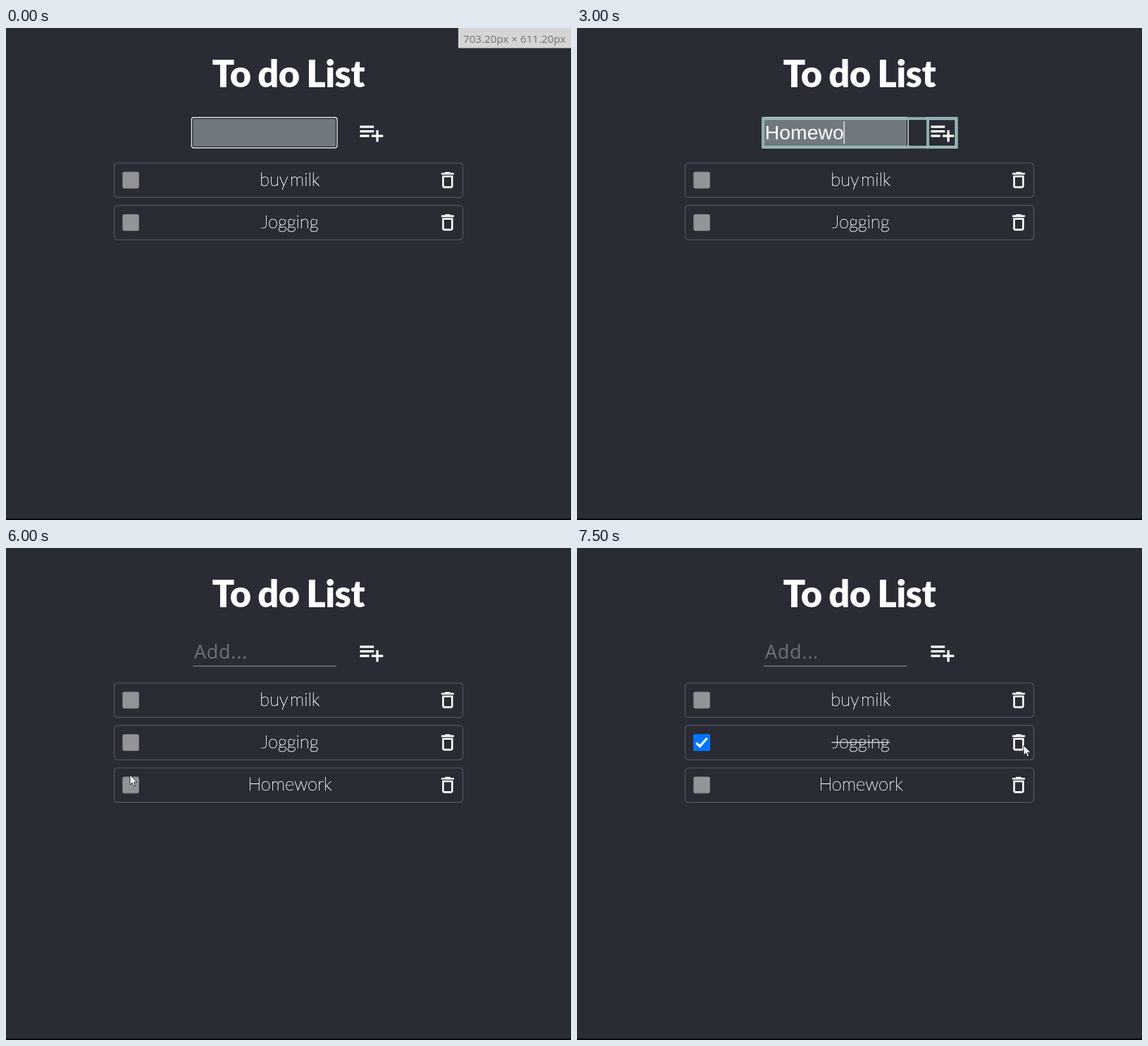
These frames come from a looping animation (802 px wide and 698 px high, 8 s). An HTML page:

```html
<!DOCTYPE html>
<html lang="en">
<head>
<meta charset="utf-8">
<title>To do List</title>
<style>
  html, body { margin: 0; width: 100%; height: 100%; overflow: hidden; background: #292c35; }
  svg { display: block; width: 802px; height: 698px; }
  .title { font: 900 52.3px Lato, sans-serif; letter-spacing: -.5px; word-spacing: -2px; fill: #fff; text-anchor: middle; }
  .label { font: 100 25.5px Lato, sans-serif; word-spacing: -4px; fill: #fff; stroke: #fff; stroke-width: .5; text-anchor: middle; }
  .typed { font: 28.4px "Liberation Sans", Arial, sans-serif; fill: #fff; }
  .placeholder { font: 27px "Open Sans", sans-serif; letter-spacing: .7px; fill: #6f7175; }
  .size { font: 15.2px "Open Sans", sans-serif; fill: #707175; }
</style>
</head>
<body>
<svg id="stage" viewBox="0 0 802 698">
  <rect width="802" height="698" fill="#292c35"/>
  <rect x="801" width="1" height="698" fill="#202229"/>
  <rect y="696" width="802" height="2" fill="#000"/>
  <text class="title" x="400.8" y="84">To do List</text>

  <g id="tip">
    <rect x="642" width="160" height="28.5" fill="#d5d5d6"/>
    <text class="size" x="649" y="20.5">703.20px × 611.20px</text>
  </g>

  <g id="focused">
    <rect x="263.5" y="127" width="206.5" height="43" rx="3" fill="#17191d" stroke="#e9eaeb" stroke-width="1.4"/>
    <rect x="265.5" y="129" width="202.5" height="39" rx="1" fill="#72787f"/>
    <text class="typed" id="typed" x="266.7" y="158"></text>
    <rect id="caret" y="132.5" width="1.2" height="31.5" fill="#fff"/>
  </g>
  <g id="blurred">
    <text class="placeholder" x="267" y="157">Add...</text>
    <path d="M265 167.5H469" stroke="#70747a" stroke-width="1.5"/>
  </g>
  <path transform="translate(499.2 128.6) scale(1.64)" fill="#fff"
    d="M14 10H2v2h12v-2zm0-4H2v2h12V6zm4 8v-4h-2v4h-4v2h4v4h2v-4h4v-2h-4zM2 16h8v-2H2v2z"/>

  <g id="items"></g>
  <g id="formGlow"></g>
  <g id="pageGlow"></g>
  <path id="cursor" d="M0 0V14L3.2 11L5.4 16L7.7 15L5.5 10.2H10Z" fill="#fff" stroke="#15171b" stroke-width=".9"/>
</svg>
<script>
const STEP = 500;
const LOOP = 8000;
const BLUE = "#0075ff", BLUE_HOVER = "#0a5cc0";
const TRASH = "M6 19c0 1.1.9 2 2 2h8c1.1 0 2-.9 2-2V7H6v12zM8 9h8v10H8V9zm7.5-5l-1-1h-5l-1 1H5v2h14V4h-3.5z";
const rowTops = [191.5, 251.7, 312];
const $ = id => document.getElementById(id);
const show = (id, on) => $(id).setAttribute("display", on ? "inline" : "none");

function item(name, i) {
  const y = rowTops[i];
  const check = i !== 1 ? "" : `
    <g id="done">
      <rect id="tick" x="165" y="${y + 12.3}" width="24" height="24" rx="3"/>
      <path d="M169.5 ${y + 25}l4.8 4.8 10.4-11.8" fill="none" stroke="#fff" stroke-width="3.2"/>
      <path d="M361.5 ${y + 24}H444" stroke="#c9cacc" stroke-width="1.4"/>
    </g>`;
  return `<g id="item${i}">
    <rect x="153.5" y="${y}" width="495" height="48.8" rx="5" fill="none" stroke="#555961" stroke-width="1.2"/>
    <rect x="165.7" y="${y + 12.8}" width="22.8" height="23" rx="2" fill="#939498" stroke="#7a7b80"/>
    <text class="label" x="402.8" y="${y + 32}">${name}</text>
    <path transform="translate(611.5 ${y + 8.8}) scale(1.28)" fill="#fff" d="${TRASH}"/>
    ${check}</g>`;
}

// A teal line with a pale edge on both sides
function glow(x, y, w, h) {
  const box = `x="${x}" y="${y}" width="${w}" height="${h}" fill="none"`;
  return `<rect ${box} stroke="#bfd3d3" stroke-width="3.6"/>
    <rect ${box} stroke="#70a3a1" stroke-width="1.5"/>`;
}

$("items").innerHTML = ["buy milk", "Jogging", "Homework"].map(item).join("");
$("formGlow").innerHTML = glow(264, 128.4, 274.5, 40.6) + glow(498, 128.4, 40.5, 40.6);
$("pageGlow").innerHTML =
  `<rect x="1" y="1" width="800" height="694.5" fill="none" stroke="#709b9a" stroke-width="2"/>` +
  rowTops.map(y => glow(153.6, y, 495, 49) + glow(612, y + 6.8, 30, 35)).join("");

const typing = { 4: "Ho", 5: "Home", 6: "Homewo" };
const caretSteps = [1, 3, 4, 5, 6, 7, 9];
const cursorAt = {
  10: [539, 152], 11: [520, 152], 12: [176, 322],
  13: [179, 270], 14: [179, 270], 15: [634, 280]
};

function render(time) {
  const step = Math.floor((time % LOOP) / STEP);
  const added = step >= 11;
  const pageGlow = step === 13;

  show("tip", step === 0);
  show("focused", !added);
  show("blurred", added);
  show("item2", added);
  show("done", step >= 13);
  show("formGlow", pageGlow || (step >= 4 && step <= 7));
  show("pageGlow", pageGlow);
  $("tick").setAttribute("fill", step === 15 ? BLUE : BLUE_HOVER);

  const typed = $("typed");
  typed.textContent = step < 4 ? "" : typing[step] || "Homework";
  show("caret", caretSteps.includes(step));
  if (!added) {
    const width = typed.textContent ? typed.getComputedTextLength() : 0;
    $("caret").setAttribute("x", 266.5 + width);
  }

  const tip = cursorAt[step];
  show("cursor", tip);
  if (tip) $("cursor").setAttribute("transform", `translate(${tip})`);
}

const start = performance.now();
function tick() {
  render(performance.now() - start);
  requestAnimationFrame(tick);
}
tick();
</script>
</body>
</html>
```
